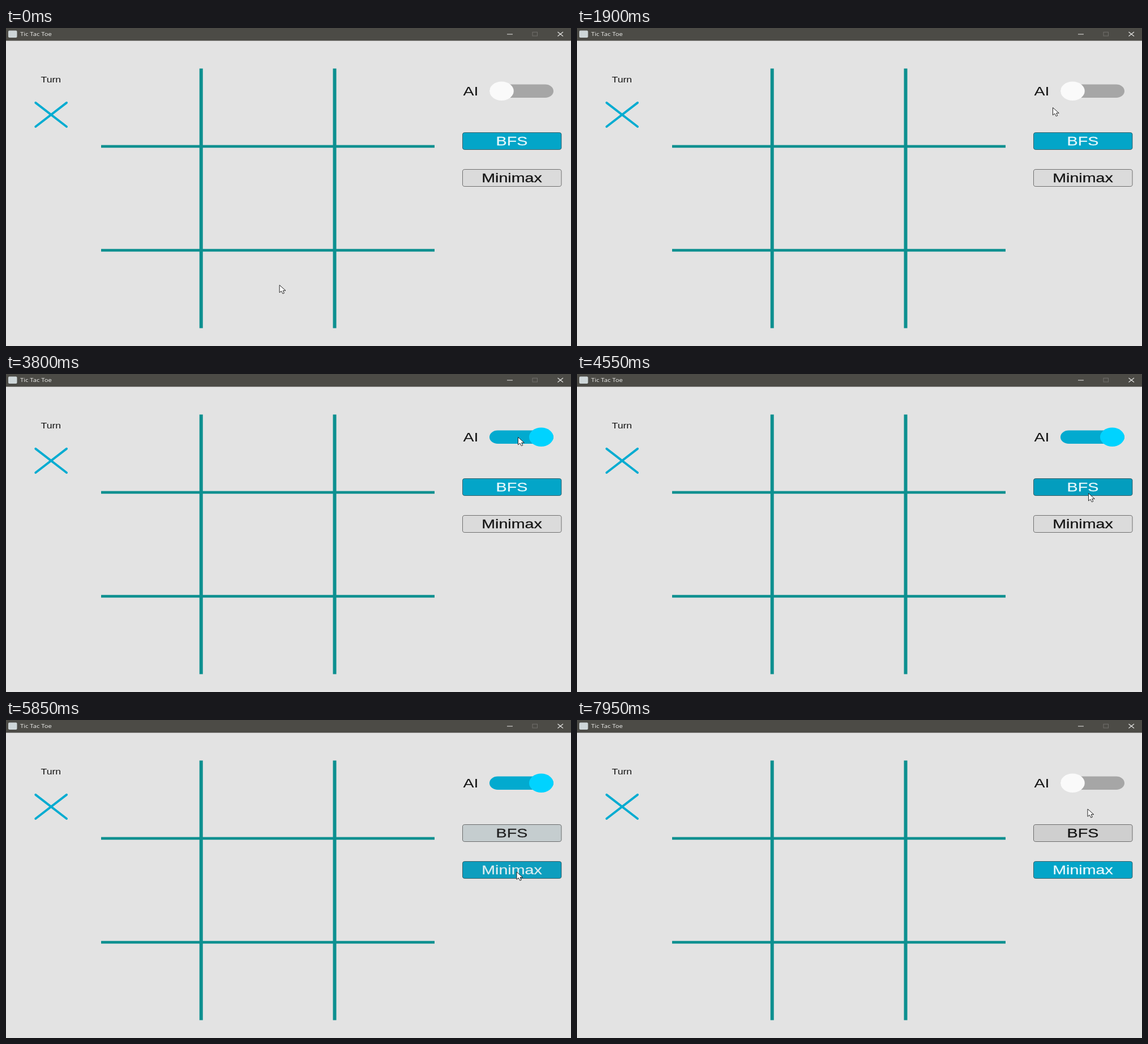
An HTML page for the animation above (8 s loop, 998 by 561 pixels).

```html
<!DOCTYPE html>
<html lang="en">
<head>
<meta charset="utf-8">
<title>Tic Tac Toe</title>
<style>
  html, body { margin: 0; width: 100%; height: 100%; overflow: hidden; background: #e3e3e3; }
  svg { display: block; width: 100vw; height: 100vh; }
  text { font: 22.4px "Liberation Sans", Arial, sans-serif; fill: #141414; }
  .title { font: 8.8px "Open Sans", "Noto Sans", sans-serif; fill: #f0f0ee; }
  .turn { font-size: 13.8px; }
  .button text { text-anchor: middle; fill: inherit; stroke: inherit; stroke-width: .25; }
  .button rect { stroke: #000; stroke-opacity: .5; }
  .grid { fill: none; stroke: #0d9090; }
  .mark { fill: none; stroke: #05acd1; stroke-width: 4; stroke-linecap: round; }
  .control { fill: none; stroke: #e6e6e4; stroke-width: 1.2; }
  .off { stroke: #706f6b; stroke-width: 1; }
</style>
</head>
<body>
<svg viewBox="0 0 998 561" preserveAspectRatio="none">
  <rect width="998" height="561" fill="#e3e3e3"/>

  <rect width="998" height="22.5" fill="#4c4b46"/>
  <rect x="4" y="4.5" width="15.5" height="12.5" rx="2" fill="#ced6d8"/>
  <text class="title" transform="translate(25 14) scale(1.28 1)">Tic Tac Toe</text>
  <path class="control" d="M885 11H895M974.5 7L984 14.5M984 7L974.5 14.5"/>
  <rect class="control off" x="930" y="7.3" width="8.5" height="6.7"/>

  <text class="turn" transform="translate(61.5 96) scale(1.28 1)">Turn</text>
  <path class="mark" d="M52.3 131.8L107 174M107 131.8L52.3 174"/>

  <path class="grid" stroke-width="6" d="M344.7 71.5V529.5M580.5 71.5V529.5"/>
  <path class="grid" stroke-width="4.6" d="M168 208.9H757M168 392.1H757"/>

  <text transform="translate(807.5 119) scale(1.28 1)">AI</text>
  <rect id="track" x="854" y="99.5" width="113" height="23.5" rx="14.5" ry="11.75"/>
  <ellipse id="knob" cx="875.4" cy="111.2" rx="21.4" ry="16.7"/>

  <g class="button" id="bfs" transform="translate(806.5 184.5)">
    <rect width="174.5" height="30" rx="4.2" ry="3.4"/>
    <text transform="translate(87 22.5) scale(1.28 1)">BFS</text>
  </g>
  <g class="button" id="minimax" transform="translate(806.5 249.5)">
    <rect width="174.5" height="30" rx="4.2" ry="3.4"/>
    <text transform="translate(87 22.5) scale(1.28 1)">Minimax</text>
  </g>

  <path id="cursor" d="M.5 .5V13.8L3.8 11L6.3 15.7L8.8 14.7L6.6 10.2H11.3Z"
        fill="#fff" stroke="#222" stroke-linejoin="round"/>
</svg>
<script>
  const LOOP = 8000, STEP = 50;
  const $ = id => document.getElementById(id);
  const mix = (a, b, p) => a + (b - a) * p;
  const blend = (from, to, p) => `color-mix(in srgb, ${to} ${p * 100}%, ${from})`;
  const smooth = p => p * p * (3 - 2 * p);
  const glide = p => 1 - (1 - p) ** 1.4;

  // Progress from 0 to 1 between two times.
  const ramp = (t, from, to) => Math.min(1, Math.max(0, (t - from) / (to - from)));

  // The pointer rests between moves.
  const home = { x: 482.6, y: 453 };
  const moves = [
    { from: 0, to: 250, x: 508, y: 430 },
    { from: 500, to: 750, x: 678, y: 237 },
    { from: 1000, to: 1350, x: 816, y: 157 },
    { from: 1750, to: 2250, x: 877, y: 113.5 },
    { from: 3500, to: 3800, x: 904, y: 111 },
    { from: 3900, to: 4500, x: 903, y: 210 },
    { from: 4750, to: 5100, x: 901.5, y: 267.5 },
    { from: 5900, to: 6350, x: 935, y: 113 },
    { from: 7800, to: 7950, x: 901.5, y: 156.5 }
  ];

  function pointer(t) {
    let { x, y } = home;
    for (const m of moves) {
      const p = glide(ramp(t, m.from, m.to));
      x = mix(x, m.x, p);
      y = mix(y, m.y, p);
    }
    return `translate(${x} ${y})`;
  }

  function paintButton(id, idle, chosen, shade) {
    const [box, label] = $(id).children;
    box.style.fill = blend(blend(idle, "#03a5c8", chosen), "#000", shade);
    label.style.fill = label.style.stroke = blend("#141414", "#e8f8fc", chosen);
  }

  function draw(t) {
    const on = smooth(ramp(t, 2950, 3250)) - smooth(ramp(t, 6750, 7010));
    $("track").style.fill = blend("#a6a6a6", "#02aacf", on);
    $("knob").style.fill = blend("#fafafa", "#00d3ff", on);
    $("knob").setAttribute("transform", `translate(${70 * on})`);

    const swap = glide(ramp(t, 5500, 5900));
    const overBfs = ramp(t, 4100, 4400) - ramp(t, 4850, 5050);
    const overMinimax = ramp(t, 4900, 5100) - ramp(t, 5950, 6150);
    const press = ramp(t, 5350, 5500) - swap;
    paintButton("bfs", blend("#dbdbdb", "#cfcfcf", swap), 1 - swap, .05 * overBfs);
    paintButton("minimax", "#dbdbdb", swap, .05 * overMinimax + .125 * press);

    $("cursor").setAttribute("transform", pointer(t));
  }

  const start = performance.now();
  function tick() {
    const t = (performance.now() - start) % LOOP;
    draw(Math.floor(t / STEP) * STEP);
    requestAnimationFrame(tick);
  }
  tick();
</script>
</body>
</html>
```
